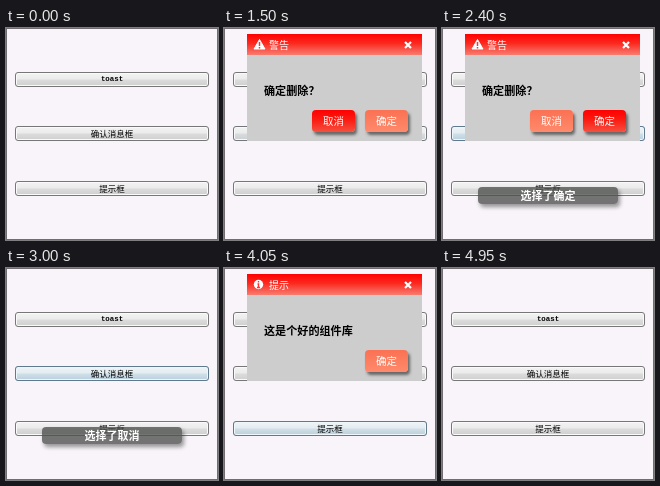
An HTML page that plays this animation: 212x212 px, repeating every 5100 ms.

```html
<!DOCTYPE html>
<html lang="zh">
<meta charset="utf-8">
<style>
html, body { margin: 0; width: 100%; height: 100%; overflow: hidden; }
#stage {
  position: relative; width: 212px; height: 212px; overflow: hidden;
  box-sizing: border-box; background: #f8f4f9;
  font-family: "Noto Sans CJK SC", "Noto Sans CJK", "Noto Sans", sans-serif;
}
#stage::after { content: ""; position: absolute; inset: 0; border: 1px solid #706c70; }
#stage div, #stage svg, #stage span { position: absolute; box-sizing: border-box; white-space: nowrap; }
.btn {
  left: 9px; width: 194px; height: 15px; border: 1px solid #777; border-radius: 3px;
  background: linear-gradient(#f3f3f3, #ebebeb 48%, #dcdcdc 52%, #cfcfcf);
  box-shadow: inset 0 0 0 1px #fafafa;
  font-size: 8.5px; line-height: 13px; text-align: center; color: #000; font-weight: 500;
}
.btn i {
  position: absolute; inset: -1px; border: 1px solid #3c7fb1; border-radius: 3px;
  background: linear-gradient(#eaf6fd, #d9f0fc 48%, #bee6fd 52%, #9bd3f3);
  box-shadow: inset 0 0 0 1px #d8f4ff; opacity: 0;
}
.btn span { inset: 0; }
.mono { font: bold 7.4px/13px "Liberation Mono", monospace; }
#dialog { left: 23px; top: 6px; width: 175px; height: 107px; background: #cdcdcd; }
#head { left: 0; top: 0; width: 175px; height: 21px; background: linear-gradient(#ff0000, #fb2a20 45%, #f87c70); }
#title { left: 22px; top: 0; font-size: 10px; line-height: 21px; color: #fff; }
#message { left: 17px; top: 47px; font-size: 11.1px; line-height: 18px; font-weight: 700; color: #000; }
.act {
  top: 76px; width: 43px; height: 22px; border-radius: 4px; color: #fff;
  font-size: 10.5px; line-height: 22px; text-align: center;
  background: linear-gradient(#ff0000, #fa1c12 45%, #f5503f);
  box-shadow: 2px 3px 3px #666;
}
.act.hover { background: linear-gradient(#fb7153, #ff8a6c); }
#toast {
  left: 36px; top: 159px; width: 140px; height: 17px; border-radius: 4px;
  background: rgba(78, 80, 78, .78); box-shadow: 2px 3px 4px rgba(0, 0, 0, .4);
  color: #fff; font-size: 11px; line-height: 17px; font-weight: 700; text-align: center;
}
</style>
<body>
<div id="stage">
  <div class="btn" style="top:44px"><i></i><span class="mono">toast</span></div>
  <div class="btn" style="top:98px"><i></i><span>确认消息框</span></div>
  <div class="btn" style="top:153px"><i></i><span>提示框</span></div>
  <div id="dialog">
    <div id="head"></div>
    <svg width="175" height="21" fill="#fff">
      <g id="warn">
        <path d="M12.5 5.5L18 15H7Z" stroke="#fff" stroke-linejoin="round"/>
        <path d="M12.5 8v4M12.5 13v1.5" stroke="#f33" stroke-width="1.5"/>
      </g>
      <g id="info">
        <circle cx="11.5" cy="10.5" r="4.7"/>
        <path d="M11.5 7v1.5M10.5 10h1v3.5M10 13.5h3" fill="none" stroke="#f33" stroke-width="1.4"/>
      </g>
      <path d="M158 8l6 6M164 8l-6 6" stroke="#fff" stroke-width="2.2"/>
    </svg>
    <div id="title"></div>
    <div id="message"></div>
    <div id="cancel" class="act" style="left:65px">取消</div>
    <div id="ok" class="act" style="left:118px">确定</div>
  </div>
  <div id="toast"></div>
</div>
<script>
const LOOP = 5100, STEP = 150;
const $ = id => document.getElementById(id);
const glows = document.querySelectorAll('.btn i');
const show = (el, on) => el.style.display = on ? '' : 'none';
const within = (t, from, to) => t >= from && t < to;
const pulse = (t, start) => .06 + .4 * (1 - Math.cos((t - start) / 2400 * 2 * Math.PI)) / 2;

function glow(t) {
  const hover2 = within(t, 600, 1050) || within(t, 1950, 2100);
  const hover3 = within(t, 3450, 3750);
  return [
    0,
    hover2 ? 1 : within(t, 1050, 3450) ? pulse(t, 1500) : 0,
    hover3 ? 1 : within(t, 3750, 4950) ? pulse(t, 3300) : 0
  ];
}

function draw(now) {
  let t = Math.floor(now % LOOP / STEP) * STEP;
  // The screen rests at these moments.
  if (within(t, 3000, 3300)) t = 3000;
  if (within(t, 4350, 4950)) t = 4350;

  glow(t).forEach((level, i) => glows[i].style.opacity = level);

  const confirm = within(t, 1050, 1800) || within(t, 2100, 2700);
  const info = within(t, 3750, 4350);
  show($('dialog'), confirm || info);
  show($('warn'), confirm);
  show($('info'), info);
  show($('cancel'), confirm);
  $('title').textContent = info ? '提示' : '警告';
  $('message').textContent = info ? '这是个好的组件库' : '确定删除？';
  $('ok').classList.toggle('hover', within(t, 1350, 1800) || within(t, 4050, 4350));
  $('cancel').classList.toggle('hover', within(t, 2250, 2700));

  const accepted = within(t, 1800, 2550), cancelled = within(t, 2700, 3300);
  show($('toast'), accepted || cancelled);
  $('toast').textContent = accepted ? '选择了确定' : '选择了取消';
}

const start = performance.now();
function tick() {
  draw(performance.now() - start);
  requestAnimationFrame(tick);
}
tick();
</script>
</body>
</html>
```
